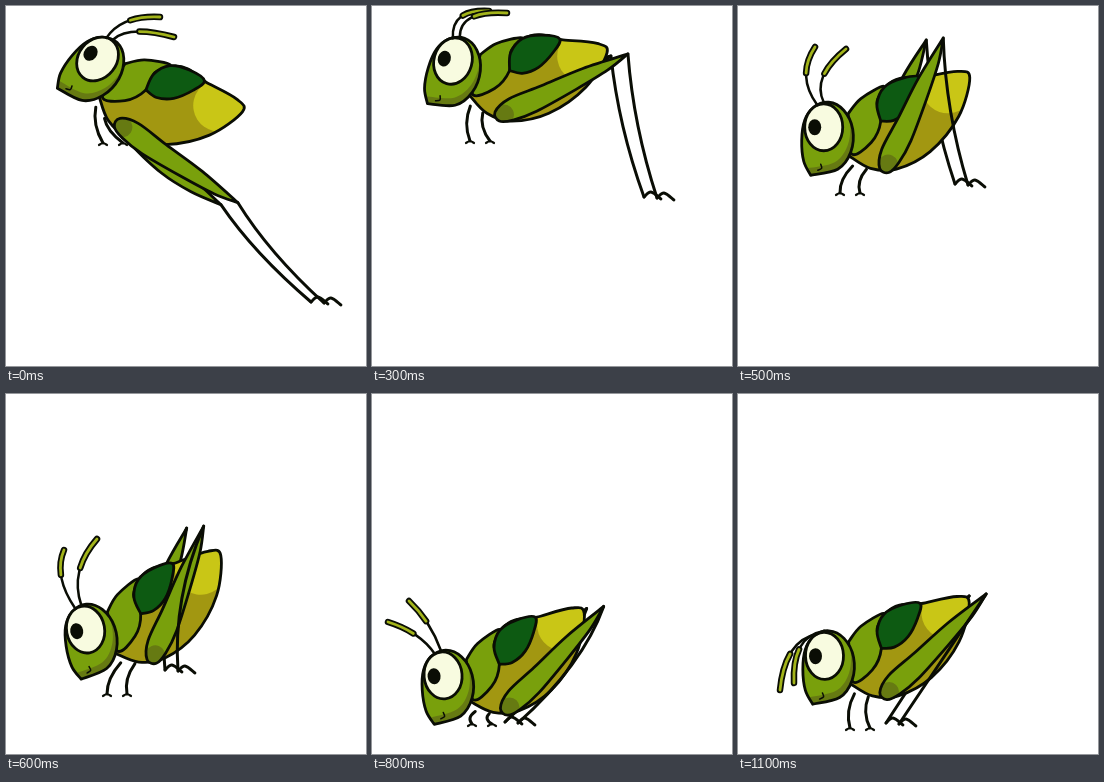
An HTML page with a canvas for the animation above (1200 ms loop, 360 by 360 pixels).

```html
<!DOCTYPE html>
<html lang="en">
<head>
<meta charset="utf-8">
<title>Grasshopper hop</title>
<style>
html, body { margin: 0; width: 100%; height: 100%; overflow: hidden; background: #fff; }
canvas { display: block; width: 360px; height: 360px; }
</style>
</head>
<body>
<canvas id="stage"></canvas>
<script>
const SIZE = 360, LOOP = 1200, HOLD = 200, RAD = Math.PI / 180;
const INK = '#0a0d05', GREEN = '#79a00c', SHADE = '#667a12', DARK = '#0d5a12',
      OLIVE = '#a29711', YELLOW = '#c9c616', CREAM = '#f8fbe0', CLUB = '#a3b41a';

const canvas = document.getElementById('stage');
const ctx = canvas.getContext('2d');
const dpr = window.devicePixelRatio || 1;
canvas.width = canvas.height = SIZE * dpr;

// One rigid body: the origin is the neck, x runs to the tail, y to the belly.
const abdomen = outline([-8, 18], [6, 39], [29, 51], [67, 50], [108, 31], [135, 1], [127, -10], [96, -19], [56, -28]);
const thorax = outline([10, -20], [28, -28], [54, -29], [41, -18], [36, 1], [18, 16], [-5, 17]);
const wing = outline([36, 1], [40, -16], [54, -28], [74, -28], [91, -21], [82, -9], [65, 3], [48, 6]);
const glow = oval(111, 0, 26, 26);

// Head, measured from the eye; thighs, measured from the hip with x to the knee.
const head = outline([-13, 48], [-20, 34], [-22, 13], [-19, -7], [-10, -20], [5, -25], [20, -17], [29, 2], [27, 25], [14, 42]);
const mouth = spline([[-6, 43], [-2, 41], [-3, 37]]);
const eye = oval(0, 0, 19, 23.5), pupil = oval(-9, 0, 6.5, 8);
const thigh = outline([137, 0], [90, -6], [45, -8], [10, -10], [-8, -4], [-8, 6], [5, 11], [30, 13], [75, 10], [112, 6]);
const farThigh = outline([137, 0], [95, -6], [55, -5], [30, 0], [70, 7], [105, 6]);
const bruise = oval(-1, 2, 10, 10);

const EYE = [-18, -18.5], NOD = 26, HIP = [23, 41], THIGH = 137;
const FAR_KNEE = [-17, 2], FAR_FOOT = [-13, -1];

// The six drawings of the hop: body tilt and thigh angle in degrees, tibia bow
// in pixels; the second feeler's tip lies "spread" away from the first.
const poses = [
  { neck: [105, 75], tilt: 12.8, thigh: 34, foot: [318, 297], bow: -12,
    front: [107, 137], stalk: [116, 9], tip: [154, 11], spread: [14, 20] },
  { neck: [102, 70], tilt: -10.3, thigh: -25.2, foot: [285, 192], bow: -9,
    front: [108, 135], stalk: [79, 3], tip: [117, 5], spread: [18, 2] },
  { neck: [110, 130], tilt: -26, thigh: -65.6, foot: [230, 179], bow: -10,
    front: [112, 187], stalk: [58, 70], tip: [77, 41], spread: [31, 2] },
  { neck: [105, 240], tilt: -36, thigh: -68.6, foot: [172, 277], bow: -18,
    front: [111, 300], stalk: [47, 182], tip: [58, 156], spread: [33, -11] },
  { neck: [96, 288], tilt: -31, thigh: -46.2, foot: [146, 329], bow: 22,
    front: [110, 330], stalk: [48, 238], tip: [16, 228], spread: [21, -21] },
  { neck: [111, 270], tilt: -27.5, thigh: -44.4, foot: [161, 330], bow: 0,
    front: [122, 334], stalk: [47, 246], tip: [42, 296], spread: [14, -7] }
];

const add = (a, b, k = 1) => [a[0] + b[0] * k, a[1] + b[1] * k];
const mix = (a, b, t) => [a[0] + (b[0] - a[0]) * t, a[1] + (b[1] - a[1]) * t];

function turn([x, y], deg) {
  const c = Math.cos(deg * RAD), s = Math.sin(deg * RAD);
  return [x * c - y * s, x * s + y * c];
}

// Catmull-Rom curve through the points.
function spline(points) {
  const path = new Path2D();
  path.moveTo(...points[0]);
  for (let i = 0; i < points.length - 1; i++) {
    const b = points[i], c = points[i + 1], a = points[i - 1] || b, d = points[i + 2] || c;
    path.bezierCurveTo(
      b[0] + (c[0] - a[0]) / 6, b[1] + (c[1] - a[1]) / 6,
      c[0] - (d[0] - b[0]) / 6, c[1] - (d[1] - b[1]) / 6, c[0], c[1]);
  }
  return path;
}

// Closed curve with its only corner at the first point.
function outline(...points) {
  const path = spline([...points, points[0]]);
  path.closePath();
  return path;
}

function oval(x, y, rx, ry) {
  const path = new Path2D();
  path.ellipse(x, y, rx, ry, 0, 0, Math.PI * 2);
  return path;
}

function arc(from, control, to) {
  const path = new Path2D();
  path.moveTo(...from);
  path.quadraticCurveTo(...control, ...to);
  return path;
}

function fill(path, color) {
  ctx.fillStyle = color;
  ctx.fill(path);
}

function stroke(path, width = 2.8, color = INK) {
  ctx.lineWidth = width;
  ctx.strokeStyle = color;
  ctx.stroke(path);
}

function within(origin, deg, paint) {
  ctx.save();
  ctx.translate(...origin);
  ctx.rotate(deg * RAD);
  paint();
  ctx.restore();
}

// Filled shape with an optional detail kept inside its outline.
function shape(path, color, detail) {
  fill(path, color);
  if (detail) {
    ctx.save();
    ctx.clip(path);
    detail();
    ctx.restore();
  }
  stroke(path);
}

function shin(knee, foot, bow) {
  stroke(arc(knee, add(mix(knee, foot, 0.5), [bow, 0]), foot), 3);
  stroke(spline([foot, add(foot, [7, -5]), add(foot, [17, 2])]));
}

function frontLeg(hip, foot) {
  stroke(arc(hip, add(mix(hip, foot, 0.5), [-7, 0]), foot), 3);
  stroke(spline([add(foot, [-4, 2]), foot, add(foot, [4, 2])]), 2.2);
}

function feeler(base, stalk, tip) {
  const t = 0.55, bend = mix(stalk, tip, t);
  const club = arc(mix(mix(base, stalk, t), bend, t), bend, tip);
  stroke(arc(base, stalk, tip), 2.5);
  stroke(club, 6.5);
  stroke(club, 2.8, CLUB);
}

function drawHead() {
  shape(head, SHADE, () => {
    ctx.translate(-3, -7);
    fill(head, GREEN);
  });
  shape(eye, CREAM);
  fill(pupil, INK);
  stroke(mouth, 1.5);
}

function draw(pose) {
  const { neck, tilt, foot, bow, front, stalk, tip, spread } = pose;
  const onBody = point => add(neck, turn(point, tilt));
  const hip = onBody(HIP);
  const knee = add(hip, turn([THIGH, 0], pose.thigh));

  ctx.setTransform(dpr, 0, 0, dpr, 0, 0);
  ctx.fillStyle = '#fff';
  ctx.fillRect(0, 0, SIZE, SIZE);
  ctx.lineCap = ctx.lineJoin = 'round';

  shin(add(knee, FAR_KNEE), add(foot, FAR_FOOT), bow);
  within(add(hip, FAR_KNEE), pose.thigh, () => shape(farThigh, GREEN));
  frontLeg(onBody([-9, 29]), add(front, [-10, 0]));
  frontLeg(onBody([2, 38]), add(front, [10, 0]));

  within(neck, tilt, () => {
    shape(abdomen, OLIVE, () => fill(glow, YELLOW));
    shape(thorax, GREEN);
    shape(wing, DARK);
    within(EYE, NOD, drawHead);
  });
  feeler(onBody([-14, -41]), stalk, tip);
  feeler(onBody([-7, -41]), add(stalk, spread, 0.5), add(tip, spread));

  within(hip, pose.thigh, () => shape(thigh, GREEN, () => fill(bruise, SHADE)));
  shin(knee, foot, bow);
}

let shown = -1;
function tick(now) {
  const index = Math.floor((now % LOOP) / HOLD) % poses.length;
  if (index !== shown) draw(poses[shown = index]);
  requestAnimationFrame(tick);
}
tick(performance.now());
</script>
</body>
</html>
```
